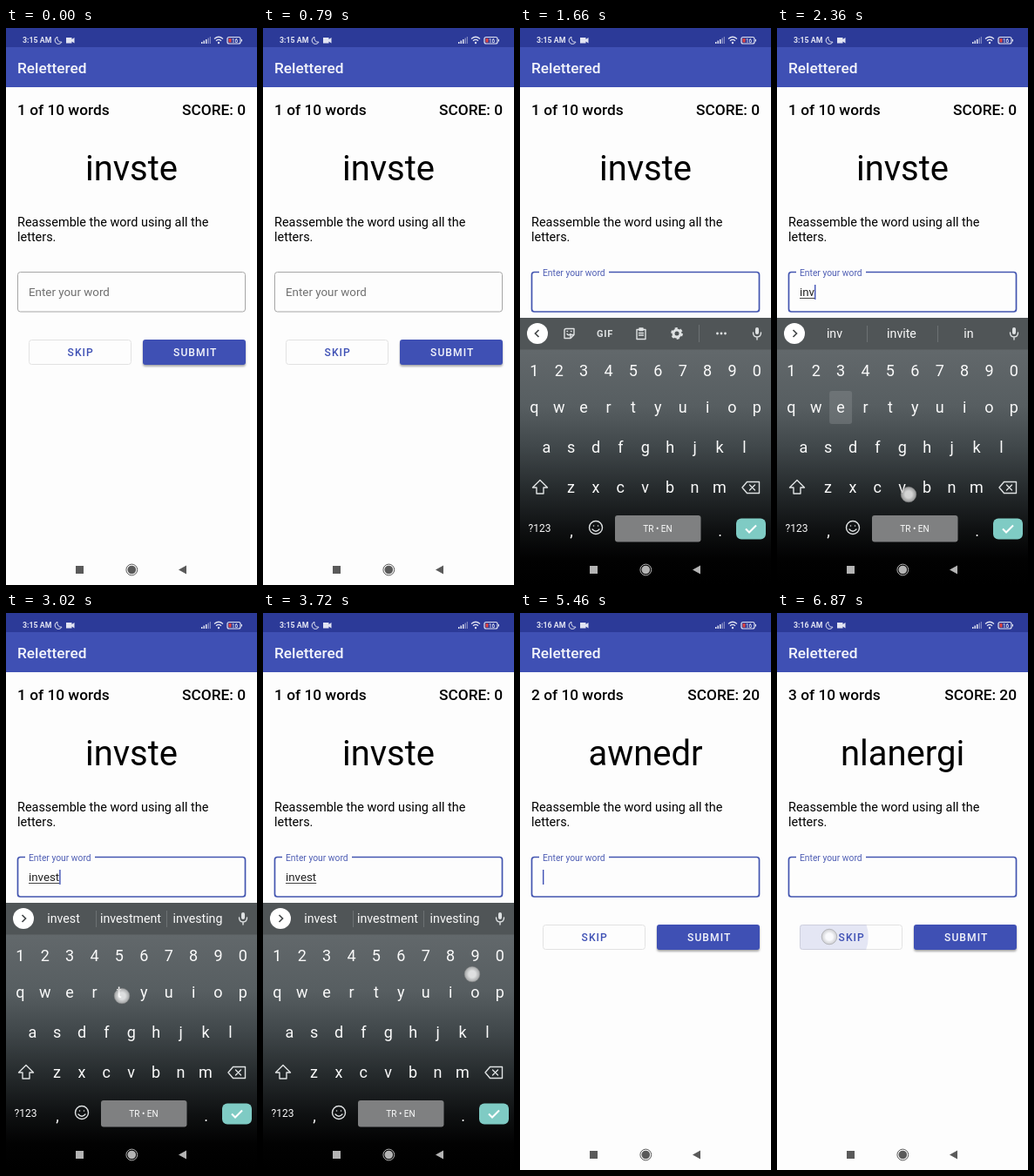
An HTML page that plays this animation: 288x640 px, repeating every 6.91 s.

```html
<!DOCTYPE html>
<html lang="en">
<head>
<meta charset="utf-8">
<title>Word game</title>
<style>
  html, body { margin: 0; width: 100%; height: 100%; overflow: hidden; background: #fdfdfd; }
  svg { display: block; width: 288px; height: 640px; font-family: Roboto, sans-serif; }
  text { white-space: pre; }
  .med { font-weight: 500; }
  .mid { text-anchor: middle; }
  .end { text-anchor: end; }
  .head { font-size: 17.3px; }
  .btn { font-size: 12.1px; font-weight: 500; letter-spacing: 1.08px; }
  .key { font-size: 18px; fill: #fafafa; }
  .tip { font-size: 14.2px; fill: #fafafa; }
  .line { fill: none; stroke: #dfe2e3; stroke-width: 1.4; stroke-linejoin: round; stroke-linecap: round; }
  .dot { fill: #dfe2e3; }
</style>
</head>
<body>
<svg viewBox="0 0 288 640">
  <defs>
    <linearGradient id="kbFill" x1="0" y1="333" x2="0" y2="640" gradientUnits="userSpaceOnUse">
      <stop offset=".12" stop-color="#62686b"/>
      <stop offset=".33" stop-color="#575e61"/>
      <stop offset=".48" stop-color="#41484b"/>
      <stop offset=".64" stop-color="#262b2d"/>
      <stop offset=".79" stop-color="#0f1112"/>
      <stop offset=".9" stop-color="#020202"/>
      <stop offset="1" stop-color="#000"/>
    </linearGradient>
    <radialGradient id="touchFill">
      <stop offset=".45" stop-color="#fff" stop-opacity=".8"/>
      <stop offset="1" stop-color="#c4c4c4" stop-opacity=".7"/>
    </radialGradient>
    <clipPath id="skipClip"><rect x="26" y="358" width="118" height="29" rx="3"/></clipPath>
    <clipPath id="submitClip"><rect x="157" y="358" width="118" height="29" rx="3"/></clipPath>
    <filter id="soft" x="-10%" y="-30%" width="120%" height="170%"><feGaussianBlur stdDeviation="1.2"/></filter>
  </defs>

  <rect width="288" height="640" fill="#fdfdfd"/>

  <!-- status bar -->
  <rect width="288" height="22" fill="#2c3a98"/>
  <g fill="#e2e4f2">
    <text id="clock" x="19" y="17.2" font-size="8.800" font-weight="600"></text>
    <path d="M59 10.2A4.2 4.2 0 1 0 64 16.2A4.6 4.6 0 0 1 59 10.2Z" fill="none" stroke="#e2e4f2"/>
    <path d="M69 11h6.5v2l3-2v6.5l-3-2v2H69Z"/>
    <path d="M224 18v-2h1.5v2ZM226.500 18v-3.500h1.500v3.500ZM229 18v-5h1.500v5Z"/>
    <path d="M231.500 18v-6.500h1.500V18ZM233.800 18v-8h1.200v8Z" opacity=".45"/>
    <g fill="none" stroke="#e2e4f2" stroke-width="1.2">
      <path d="M239 12.500q5-4.500 10 0M241 14.700q3-2.600 6 0"/>
      <rect x="254" y="10.500" width="15" height="7.500" rx="2"/>
    </g>
    <circle cx="244" cy="17" r="1.200"/>
    <rect x="255.500" y="12" width="3" height="4.500" fill="#e0433f"/>
    <path d="M270 13h1v2.500h-1Z"/>
    <text class="mid med" x="262.500" y="16.600" font-size="6.300">16</text>
  </g>

  <!-- app bar -->
  <rect y="22" width="288" height="46" fill="#3f50b4"/>
  <text class="head med" x="13" y="52" fill="#f4f5fb">Relettered</text>

  <text id="count" class="head med" x="13" y="100"></text>
  <text id="score" class="head med end" x="275" y="100"></text>
  <text id="word" class="mid" x="144" y="175" font-size="40"></text>
  <g font-size="14.450">
    <text x="13" y="228">Reassemble the word using all the</text>
    <text x="13" y="245">letters.</text>
  </g>

  <!-- input -->
  <rect id="box" x="13.500" y="280.500" width="261" height="45.500" rx="3" fill="none"/>
  <rect id="notch" x="22" y="276" width="80" height="9" fill="#fdfdfd"/>
  <text id="label" x="26">Enter your word</text>
  <text id="typed" x="26" y="308" font-size="13.300" fill="#222"></text>
  <rect id="under" x="26" y="310" height="1" fill="#444"/>
  <rect id="caret" y="295" width="1.400" height="17" fill="#3f51b5"/>

  <!-- buttons -->
  <g id="buttons">
    <rect x="26.500" y="358.500" width="117" height="28" rx="3" fill="none" stroke="#e2e2e2"/>
    <circle id="skipWave" fill="#3f51b5" clip-path="url(#skipClip)"/>
    <text class="btn" x="70.500" y="377" fill="#3f51b5">SKIP</text>
    <rect x="157" y="360" width="118" height="29" rx="3" fill="#555" opacity=".5" filter="url(#soft)"/>
    <rect x="157" y="358" width="118" height="29" rx="3" fill="#3f50b4"/>
    <circle id="submitWave" fill="#fff" clip-path="url(#submitClip)"/>
    <text class="btn" x="192" y="377" fill="#f4f5fb">SUBMIT</text>
  </g>

  <!-- keyboard -->
  <g id="board">
    <rect y="333" width="288" height="307" fill="url(#kbFill)"/>
    <rect y="333" width="288" height="36.500" fill="#505557"/>
    <rect id="press" width="26" height="38" rx="3" fill="#8b9092" opacity=".4"/>
    <circle cx="20" cy="351" r="12" fill="#fff"/>
    <path id="chevron" fill="none" stroke="#45494b" stroke-width="1.700"/>
    <g id="tools">
      <path class="line" d="M53 345.500h9v7l-4 4h-7v-9q0-2 2-2ZM62 352.500h-4v4M54 351.500q2 2.500 4 0M54 348.500h.5M58.500 348.500h.5"/>
      <text class="dot mid" x="97.500" y="355" font-size="11" font-weight="700" letter-spacing=".8">GIF</text>
      <path class="line" d="M134 346.500h10v11h-10ZM137 345h4v2.500h-4ZM136.500 350.500h5M136.500 353h5"/>
      <circle cx="180" cy="351" r="4" fill="none" stroke="#dfe2e3" stroke-width="3"/>
      <circle cx="180" cy="351" r="5.900" fill="none" stroke="#dfe2e3" stroke-width="2" stroke-dasharray="3.100 3.080"/>
      <path d="M205.500 341v20" stroke="#6c7173"/>
      <g class="dot"><circle cx="226.500" cy="351" r="1.400"/><circle cx="231" cy="351" r="1.400"/><circle cx="235.500" cy="351" r="1.400"/></g>
    </g>
    <g id="tips">
      <text class="tip mid" x="66" y="356"></text>
      <text class="tip mid" x="143" y="356"></text>
      <text class="tip mid" x="220" y="356"></text>
      <path d="M103.500 342v19M184.500 342v19" stroke="#6c7173"/>
    </g>
    <rect class="dot" x="270" y="344" width="4" height="8" rx="2"/>
    <path class="line" d="M267.500 350q0 5 4.500 5t4.500-5M272 355v3"/>
    <g id="keys"></g>
    <path class="line" d="M23 519.500l8.500 8.500h-4.500v7h-8v-7h-4.500Z"/>
    <path class="line" d="M255 528l5.500-6.500h14v13h-14ZM263.500 525l6 6M269.500 525l-6 6"/>
    <text x="9.500" y="578.500" font-size="12" fill="#fafafa">?123</text>
    <text class="key mid" x="59" y="584">,</text>
    <circle class="line" cx="87" cy="574" r="7.500"/>
    <path class="line" d="M83 576q4 4.500 8 0M84.500 572h.1M89.500 572h.1"/>
    <rect x="109" y="560" width="98.500" height="30.500" rx="3" fill="#7f8081"/>
    <text class="mid" x="158" y="579" font-size="10" fill="#fafafa">TR • EN</text>
    <text class="key mid" x="229.500" y="584">.</text>
    <rect x="248" y="563.500" width="34" height="24" rx="6" fill="#7fcbc4"/>
    <path d="M259 575.500l4 4 8-8" fill="none" stroke="#fff" stroke-width="2"/>
  </g>

  <!-- navigation -->
  <g id="nav">
    <rect x="80" y="618" width="9" height="9"/>
    <circle cx="144.300" cy="622.500" r="4.800"/>
    <circle cx="144.300" cy="622.500" r="6.400" style="fill:none;stroke:currentColor"/>
    <path d="M198 622.500l9-5v10Z"/>
  </g>

  <circle id="touch" r="8.800" fill="url(#touchFill)" stroke="#8c8c8c" stroke-opacity=".45"/>
</svg>
<script>
const LOOP = 6910;
const FOCUS = 1040, OPEN = 1110, DONE = 4080;
const $ = id => document.getElementById(id);
const set = (el, attrs) => { for (const k in attrs) el.setAttribute(k, attrs[k]); };
const show = (el, on) => { el.style.visibility = on ? "visible" : "hidden"; };
const clamp = v => Math.max(0, Math.min(1, v));
const mix = (a, b, p) => a + (b - a) * p;
const put = (el, s) => { if (el.textContent !== s) el.textContent = s; };
const latest = (list, t) => list.filter(e => e.at <= t).pop();

const rows = [
  ["1234567890", 16.3, 399.5], ["qwertyuiop", 16.3, 441.5],
  ["asdfghjkl", 30.3, 487.5], ["zxcvbnm", 58.5, 533.5]
];
const keyAt = {};
for (const [chars, x0, y] of rows) {
  [...chars].forEach((c, i) => {
    const key = document.createElementNS("http://www.w3.org/2000/svg", "text");
    const x = x0 + 28.4 * i;
    set(key, { class: "key mid", x, y });
    key.textContent = c;
    $("keys").append(key);
    keyAt[c] = [x, y - 5];
  });
}

const rounds = [
  { at: 0, word: "invste", score: 0 },
  { at: 5060, word: "awnedr", score: 20 },
  { at: 6110, word: "nlanergi", score: 20 }
];
const typing = [
  { at: 1760, text: "i", tips: ["i", "in", "is"] },
  { at: 2030, text: "in", tips: ["in", "into", "i"] },
  { at: 2300, text: "inv", tips: ["inv", "invite", "in"] },
  { at: 2420, text: "inve", tips: ["inve", "invest", "invent"] },
  { at: 2690, text: "inves", tips: ["inves", "invest", "investing"] },
  { at: 2980, text: "invest", tips: ["invest", "investment", "investing"] }
];
const touches = [
  { at: 940, end: 1030, x: 120, y: 304 },
  { at: 1730, end: 1810, x: 217, y: 438 },
  { at: 2000, end: 2080, x: 205, y: 532 },
  { at: 2270, end: 2385, x: 151, y: 536 },
  { at: 2390, end: 2470, x: 76, y: 440 },
  { at: 2660, end: 2740, x: 62, y: 486 },
  { at: 2950, end: 3030, x: 133, y: 440 },
  { at: 3660, end: 3770, x: 240, y: 415 },
  { at: 4000, end: 4080, x: 264, y: 577 },
  { at: 4950, end: 5040, x: 214, y: 373 },
  { at: 6000, end: 6090, x: 60, y: 372 },
  { at: 6750, end: LOOP, x: 60, y: 372 }
];

function wave(el, t, strength, hits) {
  const hit = latest(hits, t);
  const age = hit ? t - hit.at : LOOP;
  show(el, age < 330);
  if (age >= 330) return;
  set(el, { cx: hit.x, cy: hit.y, r: Math.min(125, age * .37) });
  el.style.opacity = strength * clamp((330 - age) / 110);
}

function drawField(t, entry, round) {
  const focused = t >= FOCUS;
  const up = clamp((t - FOCUS) / 150);
  set($("box"), { stroke: focused ? "#4355b0" : "#a6a6a6", "stroke-width": focused ? 1.7 : 1 });
  show($("notch"), up > .5);
  set($("label"), { y: mix(308, 285, up), "font-size": mix(13.35, 10.3, up), fill: focused ? "#4f5eb4" : "#6f6f6f" });

  const text = entry && round.at === 0 ? entry.text : "";
  put($("typed"), text);
  const width = text ? $("typed").getComputedTextLength() : 0;
  set($("under"), { width });
  show($("under"), text && t < DONE);

  const since = Math.max(FOCUS, entry ? entry.at : 0, round.at);
  set($("caret"), { x: 26 + width });
  show($("caret"), focused && (t - since) % 1000 < 500);
}

function drawBoard(t, entry) {
  const opened = 1 - (1 - clamp((t - OPEN) / 270)) ** 2;
  const closed = clamp((t - DONE - 20) / 240) ** 2;
  const drop = 307 * (1 - opened + closed);
  set($("board"), { transform: `translate(0 ${drop})` });
  show($("board"), drop < 307);
  show($("buttons"), t < OPEN || t > DONE + 60);
  $("nav").style.color = $("nav").style.fill = drop < 260 ? "#b4b4b4" : "#5a5a5a";

  $("tools").style.display = entry ? "none" : "";
  $("tips").style.display = entry ? "" : "none";
  set($("chevron"), { d: entry ? "M18.5 347l4 4-4 4" : "M21.5 347l-4 4 4 4" });
  if (entry) [...$("tips").querySelectorAll("text")].forEach((el, i) => put(el, entry.tips[i]));

  const pressed = typing.find(e => t >= e.at - 70 && t < e.at + 40);
  show($("press"), pressed);
  if (pressed) {
    const [x, y] = keyAt[pressed.text.slice(-1)];
    set($("press"), { x: x - 13, y: y - 19.5 });
  }
}

function draw(t) {
  const round = latest(rounds, t), entry = latest(typing, t);
  put($("clock"), t < 4200 ? "3:15 AM" : "3:16 AM");
  put($("count"), `${rounds.indexOf(round) + 1} of 10 words`);
  put($("score"), `SCORE: ${round.score}`);
  put($("word"), round.word);

  drawField(t, entry, round);
  drawBoard(t, entry);
  wave($("skipWave"), t, .13, touches.slice(-2));
  wave($("submitWave"), t, .22, touches.slice(-3, -2));

  const touch = touches.find(p => t >= p.at && t < p.end);
  show($("touch"), touch);
  if (touch) set($("touch"), { cx: touch.x, cy: touch.y });
}

const start = performance.now();
function tick() {
  draw((performance.now() - start) % LOOP);
  requestAnimationFrame(tick);
}
tick();
</script>
</body>
</html>
```
